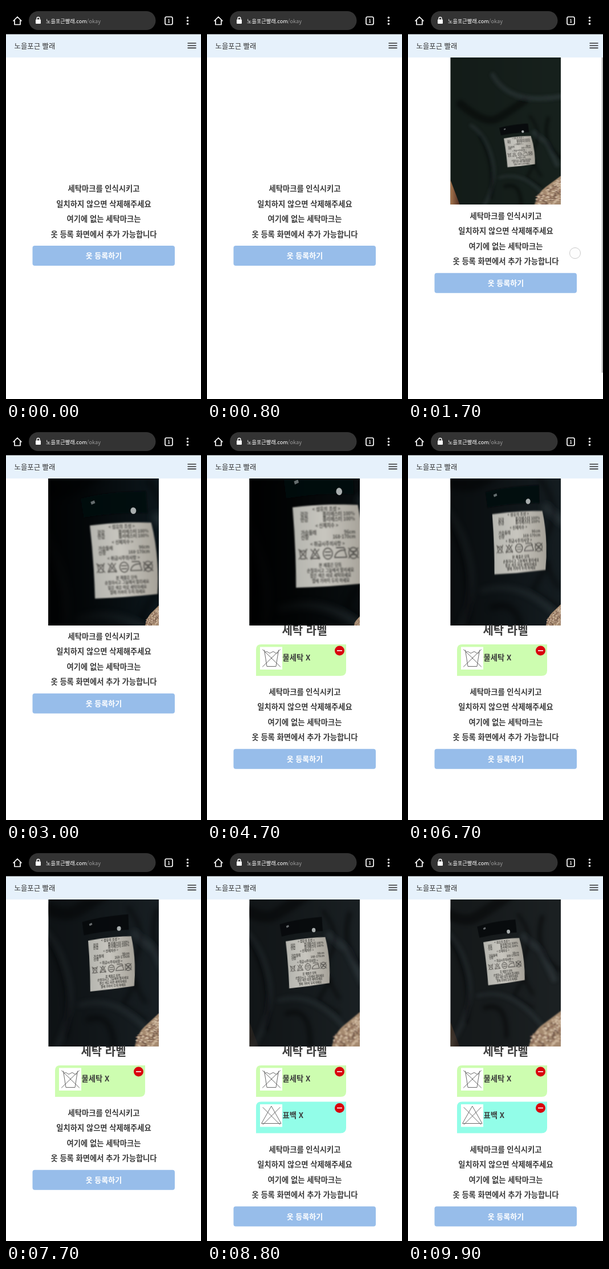
Recreate the animation shown at these times as an HTML page. Size 342 by 687 pixels, loop 10000 ms.

```html
<!DOCTYPE html>
<html lang="ko">
<head>
<meta charset="utf-8">
<title>노을포근 빨래</title>
<style>
  html, body { margin: 0; width: 100%; height: 100%; overflow: hidden; background: #fff; }
  svg { display: block; width: 100%; height: 100%; }
  text { font-family: "Noto Sans CJK KR", "Noto Sans CJK", sans-serif; }
  .copy { font-size: 13.3px; font-weight: 700; fill: #3a3a3a; }
  .mid { text-anchor: middle; }
  .line { fill: none; stroke-linecap: round; stroke-linejoin: round; }
</style>
</head>
<body>
<svg viewBox="0 0 342 687">
  <defs>
    <clipPath id="view"><rect x="74.5" y="90" width="193.5" height="257"/></clipPath>
    <filter id="soft" x="-50%" y="-50%" width="200%" height="200%"><feGaussianBlur stdDeviation="4"/></filter>
    <filter id="haze" x="-10%" y="-10%" width="120%" height="120%"><feGaussianBlur stdDeviation=".8"/></filter>
    <linearGradient id="shade">
      <stop stop-color="#000"/><stop offset=".35" stop-color="#000" stop-opacity=".75"/>
      <stop offset="1" stop-color="#000" stop-opacity="0"/>
    </linearGradient>
    <linearGradient id="paper">
      <stop stop-color="#b5b5af"/><stop offset=".45" stop-color="#c8c6bf"/><stop offset="1" stop-color="#a5a198"/>
    </linearGradient>
    <linearGradient id="floor" x2="1">
      <stop stop-color="#a9784f"/><stop offset="1" stop-color="#4c2b20"/>
    </linearGradient>
    <g id="wash" class="line">
      <path d="M7.5 6 L12 34.5 H28 L32.5 6 M8.5 10 q3-3 5.8 0 t5.8 0 t5.8 0 t5.8 0 M4.5 5 L35.5 35 M35.5 5 L4.5 35"/>
    </g>
    <g id="bleach" class="line"><path d="M20 4 L37 34 H3 Z M5 6 L35 36 M35 6 L5 36"/></g>
    <g id="minus">
      <circle r="8.5" fill="#d9000d"/>
      <path d="M-4.5 0 H4.5" stroke="#fff" stroke-width="1.6"/>
    </g>
  </defs>

  <rect width="342" height="687" fill="#fff"/>

  <g id="video" clip-path="url(#view)">
    <rect id="cloth" x="74" y="90" width="194" height="258"/>
    <g id="folds" class="line" filter="url(#soft)"></g>
    <rect id="dark" x="74" y="90" width="194" height="258" fill="url(#shade)"/>
    <path id="floorStrip" d="M74 303 L91 348 H74 Z" fill="url(#floor)"/>
    <g id="knit" filter="url(#haze)"></g>
    <g id="tag"></g>
  </g>

  <g id="cards">
    <text class="mid" x="171" y="363" font-size="20" font-weight="700" fill="#3a3a3a">세탁 라벨</text>
    <g id="washCard"></g>
    <g id="bleachCard"></g>
  </g>

  <g id="foot">
    <g id="copy" class="copy mid"></g>
    <rect x="46.5" y="419" width="249.5" height="35" rx="4" fill="#97bdea"/>
    <text class="mid" x="171.5" y="441" font-size="13" font-weight="700" fill="#fff">옷 등록하기</text>
  </g>

  <g id="touch">
    <circle cx="293" cy="432" r="9.5" fill="#fdfdfd" stroke="#c8c8c8"/>
    <rect x="339.5" y="90" width="2.5" height="551" fill="#bdbdbd"/>
  </g>

  <rect width="342" height="49.6" fill="#000"/>
  <rect x="40" y="9" width="222.5" height="33" rx="16.5" fill="#333"/>
  <path class="line" d="M13 26 L20 19 L27 26 M15 25 V32.5 H25 V25" stroke="#fff" stroke-width="1.7"/>
  <rect x="52" y="23.5" width="9" height="7.5" rx="1" fill="#fff"/>
  <path class="line" d="M54 24 V22 a2.5 2.5 0 0 1 5 0 V24" stroke="#fff" stroke-width="1.3"/>
  <text x="70" y="29.5" font-size="9.2" font-weight="500" fill="#fff">노을포근빨래.com<tspan fill="#9a9a9a">/okay</tspan></text>
  <rect x="279" y="19" width="13" height="13.5" rx="2.5" fill="none" stroke="#fff" stroke-width="1.7"/>
  <text class="mid" x="285.5" y="29" font-size="8" font-weight="700" fill="#fff">1</text>
  <g fill="#fff"><circle cx="318.5" cy="20.3" r="1.7"/><circle cx="318.5" cy="25.8" r="1.7"/><circle cx="318.5" cy="31.3" r="1.7"/></g>
  <rect y="49.6" width="342" height="40.4" fill="#e6f1fb"/>
  <text x="14.5" y="74.5" font-size="12.4" fill="#333">노을포근 빨래</text>
  <path d="M318.5 65 H333.5 M318.5 69.2 H333.5 M318.5 73.4 H333.5" stroke="#333" stroke-width="1.6"/>
</svg>
<script>
const $ = id => document.getElementById(id);
const LOOP = 10000, VIDEO_AT = 1200, WASH_AT = 3900, BLEACH_AT = 8300;

// Time, tag origin, across vector, down vector, cloth rgb, left shade, knit left/top, floor opacity
const camera = [
  [1200, 165, 236,  47, -4,  6,  50, 23, 33, 29, .15, 222, 297, 1],
  [1700, 168, 231,  49, -4,  6,  51, 23, 33, 29, .15, 222, 297, 1],
  [3000, 147, 171, 111, -4,  8, 129, 13, 23, 28, .9, 244, 312, 0],
  [4700, 150, 139, 118, -3,  5, 142, 9, 14, 16, .95, 258, 331, 0],
  [5800, 151, 143, 102, -3,  3, 121, 18, 27, 31, .65, 256, 329, 0],
  [7700, 144, 161,  78, -7,  3,  90, 24, 31, 35, .4, 226, 289, 0],
  [9900, 132, 164,  65, -7,  8,  76, 28, 33, 35, .25, 212, 285, .3]
];

function cameraAt(t) {
  const i = Math.max(1, camera.findIndex(k => k[0] >= t));
  const [a, b] = [camera[i - 1], camera[i]];
  const p = Math.max(0, (t - a[0]) / (b[0] - a[0]));
  return a.map((v, n) => v + (b[n] - v) * p).slice(1);
}

let seed = 7;
const rand = () => (seed = seed * 16807 % 2147483647) / 2147483647;

function buildFolds() {
  const crease = (d, color, width) => `<path d="${d}" stroke="${color}" stroke-width="${width}" opacity=".4"/>`;
  const light = '#3f4b51', black = '#05090b';
  $('folds').innerHTML =
    crease('M20 70 Q90 130 125 110 T200 60', black, 22) +
    crease('M50 130 Q95 160 110 230 T70 380', light, 10) +
    crease('M75 160 Q120 240 105 330', black, 10) +
    crease('M225 150 L262 180 L290 240', light, 13) +
    crease('M215 105 Q250 150 230 185 T245 270', black, 7) +
    crease('M265 110 Q245 180 300 220', black, 10) +
    crease('M130 275 Q175 262 215 290 T280 360', light, 8) +
    crease('M145 300 Q190 285 190 360', black, 10) +
    crease('M228 235 L205 275 L245 300', black, 7) +
    crease('M110 -10 Q150 60 250 55 T370 10', light, 14);
}

function buildKnit() {
  const tones = ['#cdb59b', '#8e6c5c', '#dac6ae', '#765c4c'];
  let s = '<path d="M0 60 Q5 35 18 23 L42 0 H90 V90 H0 Z" fill="#a58a70"/>';
  for (let i = 0; i < 200; i++) {
    const x = 3 + rand() * 45, y = Math.max(0, 46 - x) + rand() * 45;
    s += `<circle cx="${x.toFixed(1)}" cy="${y.toFixed(1)}" r="1.5" fill="${tones[i % 4]}"/>`;
  }
  $('knit').innerHTML = s;
}

function buildTag() {
  const row = (y, a, b = '') => `<text x="11" y="${y}">${a}</text><text x="92" y="${y}" text-anchor="end">${b}</text>`;
  const title = (y, s) => `<text class="mid" x="50" y="${y}">&lt; ${s} &gt;</text>`;
  const icon = (id, x) => `<use href="#${id}" transform="translate(${x} 51) scale(.4)" stroke="#55534f" stroke-width="3"/>`;
  const round = x => `<circle cx="${x}" cy="59" r="6.8"/><path d="M${x - 4} 57 h8 M${x - 4} 61 h8"/>`;
  const notes = ['본 제품은 단독', '손질하시고 그늘에서 말리세요', '짙은 색은 따로 세탁하세요', '열에 가까이 두지 마세요']
    .map((s, i) => `<text class="mid" x="53" y="${75 + i * 6.5}" font-size="5.6">${s}</text>`).join('');
  $('tag').innerHTML =
    `<path d="M-12 -36 Q30 -44 92 -43 V-13 Q40 -16 -9 -10 Z" fill="#06090b" opacity=".85" filter="url(#haze)"/>
     <path d="M4 -29 l6 -2" stroke="#a8aeb0" stroke-width="4" opacity=".6"/>
     <circle cx="70" cy="-17" r="4.5" fill="#a9aeae"/>
     <path d="M0 1 Q50 -3 97 0 Q107 45 100 97 Q50 100 1 100 Q3 50 0 1 Z" fill="url(#paper)" filter="url(#haze)"/>
     <g filter="url(#haze)" font-size="6.3" font-weight="700" fill="#484743">` +
    title(6, '섬유의 조성') + row(13, '겉감', '폴리에스터 100%') + row(19, '안감', '폴리에스터 100%') +
    title(27, '신체치수') + row(35, '가슴둘레', '96cm') + row(41, '신장', '168-170cm') +
    title(49, '취급시주의사항') + icon('wash', 5) + icon('bleach', 23) +
    `<g class="line" stroke="#55534f" stroke-width="1.4">${round(50)}
       <path d="M60 64 Q62 55 75 55 L78 64 Z M63 52 H74 L76 55"/>${round(88)}<path d="M81 53 L95 65 M95 53 L81 65"/></g>` +
    notes + '</g>';
}

function buildCard(id, y, color, icon, label) {
  $(id).innerHTML =
    `<path transform="translate(86 ${y})" d="M9 0 H158 V46 Q158 55 148 55 H0 V9 Q0 0 9 0 Z" fill="${color}"/>
     <rect x="93" y="${y + 4.5}" width="39" height="39.5" fill="#fff"/>
     <use href="#${icon}" transform="translate(93 ${y + 4})" stroke="#666" stroke-width="1"/>
     <text class="copy" x="132.5" y="${y + 28}">${label}</text>
     <use href="#minus" x="232.5" y="${y + 11}"/>`;
}

function build() {
  buildFolds();
  buildKnit();
  buildTag();
  buildCard('washCard', 380, '#cdfdb0', 'wash', '물세탁 X');
  buildCard('bleachCard', 443.5, '#92fde8', 'bleach', '표백 X');
  $('copy').innerHTML = ['세탁마크를 인식시키고', '일치하지 않으면 삭제해주세요', '여기에 없는 세탁마크는', '옷 등록 화면에서 추가 가능합니다']
    .map((s, i) => `<text x="171.5" y="${324.3 + i * 26.5}">${s}</text>`).join('');
}

const show = (id, on) => $(id).setAttribute('visibility', on ? 'visible' : 'hidden');
const move = (id, value) => $(id).setAttribute('transform', value);

function drawCamera(t) {
  const [x, y, ax, ay, bx, by, r, g, b, shade, knitX, knitY, floor] = cameraAt(t);
  const cx = x + (ax + bx) / 2, cy = y + (ay + by) / 2;
  $('cloth').setAttribute('fill', `rgb(${r},${g},${b})`);
  $('dark').setAttribute('opacity', shade);
  $('floorStrip').setAttribute('opacity', floor);
  move('folds', `translate(${cx} ${cy}) scale(${ax / 78}) translate(-185 -203)`);
  move('knit', `translate(${knitX} ${knitY}) scale(${(268 - knitX) / 42} ${(347 - knitY) / 60})`);
  move('tag', `matrix(${ax / 100} ${ay / 100} ${bx / 100} ${by / 100} ${x} ${y})`);
}

function render(now) {
  const t = Math.floor(now % LOOP / 100) * 100;
  const live = t >= VIDEO_AT, washed = t >= WASH_AT, bleached = t >= BLEACH_AT;
  const touching = t >= 1500 && t < 2000;
  show('video', live);
  show('cards', washed);
  show('washCard', washed);
  show('bleachCard', bleached);
  show('touch', touching);
  const shift = bleached ? 207.5 : washed ? 143.7 : t >= 2000 ? 46.7 : live ? 47.7 : 0;
  move('foot', `translate(0 ${shift})`);
  if (live) drawCamera(t);
}

build();
const start = performance.now();
function tick() {
  render(performance.now() - start);
  requestAnimationFrame(tick);
}
tick();
</script>
</body>
</html>
```
